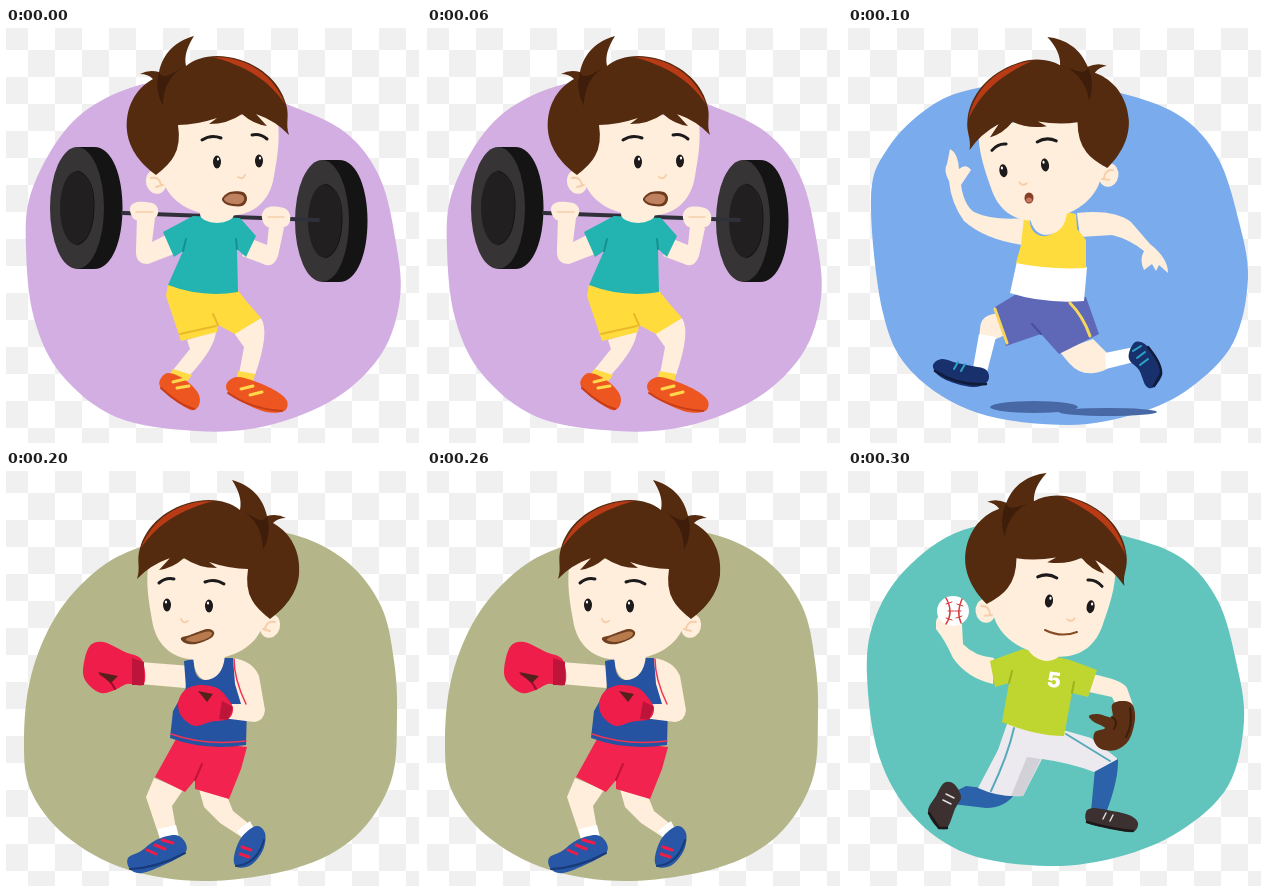
These frames come from a looping animation (415 by 415 pixels, 0.4 s). An HTML page with a canvas:

```html
<!DOCTYPE html>
<html lang="en">
<head>
<meta charset="utf-8">
<title>Sporty boy</title>
<style>
html, body { margin: 0; width: 100%; height: 100%; overflow: hidden; background: #fff; }
canvas { display: block; width: 415px; height: 415px; }
</style>
</head>
<body>
<canvas id="stage" width="415" height="415"></canvas>
<script>
const ctx = document.getElementById('stage').getContext('2d');
const SKIN = '#feeedb', SHADE = '#f6cfaa', HAIR = '#552b10', INK = '#1d1a1b';

// Straight or curved shape from SVG path data.
function fill(color, d) {
  ctx.fillStyle = color;
  ctx.fill(new Path2D(d));
}
function line(color, width, d) {
  ctx.strokeStyle = color;
  ctx.lineWidth = width;
  ctx.lineCap = ctx.lineJoin = 'round';
  ctx.stroke(new Path2D(d));
}
function oval(color, x, y, rx, ry, turn = 0) {
  ctx.fillStyle = color;
  ctx.beginPath();
  ctx.ellipse(x, y, rx, ry, turn, 0, 7);
  ctx.fill();
}
// Smooth closed curve through "x,y x,y ..." points.
function smooth(color, text) {
  const p = text.split(' ').map(s => s.split(',').map(Number));
  const n = p.length, at = i => p[(i + n) % n];
  ctx.beginPath();
  ctx.moveTo(...p[0]);
  for (let i = 0; i < n; i++) {
    const [a, b, c, d] = [at(i - 1), at(i), at(i + 1), at(i + 2)];
    ctx.bezierCurveTo(b[0] + (c[0] - a[0]) / 6, b[1] + (c[1] - a[1]) / 6,
      c[0] - (d[0] - b[0]) / 6, c[1] - (d[1] - b[1]) / 6, ...c);
  }
  ctx.fillStyle = color;
  ctx.fill();
}

function checkerboard() {
  const cell = 27, start = -5;
  ctx.fillStyle = '#fff';
  ctx.fillRect(0, 0, 415, 415);
  ctx.fillStyle = '#f0f0f0';
  for (let row = 0; row < 16; row++)
    for (let col = row % 2; col < 16; col += 2)
      ctx.fillRect(start + col * cell, start + row * cell, cell, cell);
  ctx.fillStyle = '#fff';
  ctx.fillRect(413, 0, 2, 415);
}

// Head looking right; tilt turns it about the near eye, mirror is the flip width.
function head({ tilt = 0, dx = 0, dy = 0, mirror = 0 }) {
  ctx.save();
  if (mirror) {
    ctx.translate(mirror, 0);
    ctx.scale(-1, 1);
  }
  ctx.translate(211 + dx, 134 + dy);
  ctx.rotate(tilt);
  ctx.translate(-211, -134);
  fill(SKIN, 'M150 90C150 125 154 148 160 160C171 180 195 188 220 188C247 188 264 174 268 148C271 130 275 112 271 86Z');
  oval(SKIN, 150, 154, 10, 12, -.3);
  line(SHADE, 2, 'M145 150Q153 148 155 157M150 159L157 157');
  fill(HAIR, `M150 147C136 137 123 122 121 103C119 80 129 61 147 51
    Q142 46 134 46Q143 41 153 44C157 25 170 13 188 8C181 19 178 28 180 38
    C190 30 205 26 222 29C253 34 274 54 280 76C284 89 279 95 283 107
    Q270 93 250 86L261 98Q247 96 236 86Q222 96 203 96L211 90Q190 97 172 97
    Q175 116 168 128Q164 136 150 147Z`);
  fill('#3e1d0b', 'M180 38C163 46 157 62 157 78Q148 61 153 44C157 54 169 43 180 38Z');
  fill('#b83b16', 'M207 29C242 29 268 47 279 76C262 51 239 38 207 29Z');
  line(INK, 3, 'M196 112Q205 106 215 110M246 107Q254 105 261 111');
  oval(INK, 211, 134, 4, 6.5);
  oval(INK, 253, 133, 4, 6.5);
  oval('#fff', 212, 131, 1.1, 1.5);
  oval('#fff', 254, 130, 1.1, 1.5);
  line(SHADE, 2, 'M232 149Q237 152 239 147');
  ctx.restore();
}

function weight(x, y, innerX) {
  const outline = `M${x} ${y - 61}h17c38 0 38 122 0 122h-17Z`;
  fill('#151414', outline);
  oval('#373435', x, y, 27, 61);
  oval('#211f20', innerX, y, 17, 37);
  line('#151414', 1, `M${innerX} ${y - 37}q18 5 17 37t-17 37`);
}

function lifter() {
  smooth('#d3aee2', '20,220 25,165 57,105 100,70 160,52 225,58 283,77 340,105 374,150 390,215 394,270 376,325 330,370 260,398 190,403 110,389 55,346 28,290');
  weight(71, 180, 71);
  weight(316, 193, 319);
  line('#30303a', 4, 'M117 185L312 192');

  fill(SKIN, 'M131 188L149 190L146 214L162 206L168 226L142 236Q129 236 130 222Z');
  fill(SKIN, 'M263 198L278 200L272 228Q268 239 260 237L236 228L246 211L261 217Z');
  fill(SKIN, 'M181 312L210 303Q209 320 184 347L167 342L184 321Z');
  fill(SKIN, 'M228 305L255 290Q264 304 249 347L233 346L238 319Z');
  fill('#ffdb45', 'M167 341L186 347L180 355L163 348ZM232 343L249 346L247 355L231 351Z');
  smooth('#ed5521', '154,352 162,345 178,351 192,365 193,377 185,382 167,371 155,360');
  smooth('#ed5521', '221,355 231,349 248,353 270,363 281,373 278,383 260,384 236,374 222,364');
  line('#c63d17', 2, 'M155 360Q173 377 188 381M222 365Q245 381 276 383');
  line('#ffd84b', 3, 'M167 354L179 351M171 360L183 358M235 361L247 358M244 367L256 364');
  fill('#ffdc3b', 'M162 256L160 268L175 313L211 304L212 297L229 306L255 290L241 274L230 260Z');
  line('#e9b92a', 2, 'M212 297L207 286M174 306L210 298');
  fill('#23b3b0', 'M187 188L157 204L168 229L177 223L162 257Q196 270 232 264L231 221L240 229L250 208L234 190Z');
  line('#15908e', 2, 'M177 223L180 211M231 221L230 211');
  oval(SKIN, 211, 186, 17, 9);
  smooth(SKIN, '124,180 131,174 146,175 152,181 150,189 140,193 128,191');
  smooth(SKIN, '256,186 263,179 278,180 284,187 282,197 270,201 259,197');
  line(SHADE, 1.5, 'M130 184h17M262 189h16');

  head({});
  smooth('#6f3a1d', '216,171 224,164 237,164 241,171 236,178 222,177');
  smooth('#bf8260', '218,171 225,166 236,167 238,172 233,176 223,175');
}

function runner() {
  smooth('#7aaced', '23,170 40,120 80,80 125,61 200,54 280,67 335,90 370,130 390,190 400,250 385,315 342,360 290,385 220,397 130,385 65,345 35,285');
  oval('#4868a5', 186, 379, 44, 6);
  oval('#4868a5', 260, 384, 49, 4);

  fill(SKIN, `M102 121Q110 125 111 141Q118 135 123 142L113 157Q116 177 126 184
    Q145 193 177 190L174 217Q136 211 116 193Q103 175 101 153Q95 142 99 136Z`);
  fill(SKIN, `M229 185Q266 181 283 194L302 216Q320 230 320 245L311 237L308 243
    L304 236L296 242Q291 232 296 223Q281 211 264 207L232 209Z`);
  fill(SKIN, 'M152 285Q132 286 132 301L131 312L148 311L162 305Z');
  fill('#fff', 'M131 306L148 309L139 344L125 340Z');
  fill(SKIN, 'M211 323L245 311L259 325L259 341Q236 352 221 335Z');
  fill('#fff', 'M257 325L286 319L290 333L258 341Z');
  smooth('#18316d', '85,337 94,331 109,335 124,338 137,341 141,348 138,355 126,359 106,355 90,347');
  line('#101b38', 2.5, 'M87 343Q110 358 138 356');
  line('#2ba7c9', 2, 'M110 334L106 341M117 336L113 343');
  smooth('#18316d', '281,325 286,315 293,314 301,320 311,336 314,347 306,359 298,358 291,342 282,333');
  line('#101b38', 2.5, 'M300 319Q314 336 313 346L306 358');
  line('#2ba7c9', 2, 'M285 323l8-5M289 330l8-6M292 337l8-6');

  fill('#5e68b6', 'M170 265L147 279L158 318L193 306L211 326L251 306L238 269Z');
  line('#48509a', 2, 'M193 306L184 296');
  line('#f6d75c', 3, 'M147 281L159 315M222 275Q235 288 242 308');
  fill('#fff', 'M169 233L162 265Q196 276 236 273L239 239Z');
  fill('#ffdc3d', 'M176 190L173 217L168 235Q201 242 238 240L238 212L229 201L228 186L218 184Q210 210 193 208Q180 204 182 188Z');
  fill(SKIN, 'M181 184L219 182Q218 206 197 207Q183 205 181 184Z');

  head({ tilt: .162, dx: -10, dy: 3, mirror: 398 + 12 - 12 });
  oval('#873e27', 181, 170, 4.5, 5.5);
  oval('#c87761', 181, 172, 3, 2.5);
}

function boxer() {
  smooth('#b5b58a', '18,270 25,205 50,145 90,100 135,76 210,58 285,63 340,90 375,135 388,190 391,245 385,310 350,365 290,397 200,410 120,398 60,365 25,320');
  fill(SKIN, 'M134 191L185 195L179 217L134 213Z');
  fill(SKIN, 'M148 307L177 319L166 335L171 363L153 365L140 326Z');
  fill(SKIN, 'M193 318L221 325L227 340L247 356L237 367L214 352L198 336Z');
  fill('#fff', 'M152 358L170 354L173 366L154 370ZM231 360L244 350L248 358L237 368Z');
  smooth('#2757a6', '122,387 135,380 150,369 169,364 179,371 179,382 160,393 136,402 124,398');
  smooth('#2757a6', '228,386 235,367 250,355 259,362 257,379 245,394 231,396');
  line('#173a78', 2, 'M124 398Q151 397 179 382M230 395Q251 393 258 369');
  line('#ed1d4a', 3, 'M141 379l9 4M149 374l10 4M156 369l11 3M236 376l9 3M234 383l9 3');
  fill('#f2234e', 'M170 268L149 306L179 321L189 309L189 318L223 328L235 298L241 276Z');
  line('#c31339', 2, 'M189 309L196 293');
  fill('#2552a1', 'M178 190L180 217L167 240L164 267Q199 280 240 274L241 236L231 210L228 187L218 187Q216 208 198 209Q187 207 188 188Z');
  fill(SKIN, 'M187 184L219 184Q217 208 199 209Q188 206 187 184Z');
  fill(SKIN, 'M227 187Q247 190 253 205L259 239Q258 250 248 251L216 247L219 233L235 233L229 213Z');
  line('#ef3454', 1.5, 'M228 188Q228 208 240 233M165 263Q199 275 240 270');
  smooth('#ef1d4a', '77,200 83,176 97,171 119,181 136,189 138,213 121,213 109,219 95,222 82,213');
  fill('#bd1539', 'M126 187L138 191L138 214L126 214Z');
  line('#a30d2d', 2, 'M94 203Q105 209 109 218');
  fill('#54211c', 'M92 201L112 205L105 212Z');
  smooth('#ef1d4a', '172,233 178,220 193,214 211,217 222,228 227,238 222,248 204,251 189,255 176,246');
  fill('#bd1539', 'M216 230L227 236L222 249L213 248Z');
  fill('#54211c', 'M192 220L207 223L201 231Z');

  head({ dy: 1, mirror: 414 });
  smooth('#704022', '175,167 184,164 201,158 208,161 205,167 190,173 179,172');
  smooth('#b77b4e', '180,168 199,161 206,162 202,167 189,171');
}

function pitcher() {
  smooth('#62c5bd', '19,205 26,150 57,99 115,59 200,50 280,66 335,88 370,130 388,190 396,250 380,315 332,360 270,386 200,395 120,383 65,345 31,285');
  fill(SKIN, 'M88 151Q89 142 99 146L114 153L115 173Q126 185 146 187L145 213Q119 207 105 187Q97 169 88 158Z');
  fill(SKIN, 'M244 203Q275 209 279 217L285 234L270 238L264 226L241 221Z');
  oval('#fff', 105, 140, 16, 15);
  line('#d83b3e', 1.5, 'M98 127Q106 141 98 153M114 128Q108 141 113 152');
  line('#d83b3e', 1, 'M98 133l6-2M100 140l6 0M98 147l6 2M109 133l6 2M107 140l6 0M108 147l6-2');

  fill('#2b62aa', 'M118 315L168 321Q158 337 138 337L104 333L110 319Z');
  fill('#2b62aa', 'M247 298L270 287Q271 308 258 342L243 340Z');
  smooth('#3c3030', '80,340 88,325 96,312 106,313 113,326 107,338 99,357 88,355');
  smooth('#3c3030', '238,341 245,337 259,339 281,344 290,352 284,361 260,357 240,352');
  line('#1c191a', 2.5, 'M81 342L91 357L99 357M239 351Q262 358 285 360');
  line('#ddd', 1.5, 'M98 323l8 4M95 329l8 4M258 342l-3 6M265 344l-3 6');
  fill('#eceaee', 'M160 250L150 279L130 317Q152 327 175 325L194 288Q223 292 246 301L270 288L243 267L215 259Z');
  fill('#d3d1d8', 'M193 288L175 325L163 325L179 286Z');
  line('#57aabb', 2, 'M166 257Q160 284 143 320M218 263L262 290');
  fill('#bfd630', 'M175 178L142 190L147 216L161 212L154 251Q188 265 216 265L224 222L240 226L249 199L222 189Z');
  line('#9cb31f', 2, 'M161 212L164 200M224 222L226 211');
  fill(SKIN, 'M178 175L213 178Q213 190 197 190Q184 188 178 175Z');
  ctx.save();
  ctx.translate(206, 209);
  ctx.rotate(.12);
  ctx.fillStyle = '#fff';
  ctx.font = '900 21px Inter, sans-serif';
  ctx.textAlign = 'center';
  ctx.textBaseline = 'middle';
  ctx.fillText('5', 0, 1);
  ctx.restore();
  smooth('#5c3014', '241,245 250,243 264,246 264,234 273,230 284,233 287,248 281,269 268,279 253,278 246,270 247,261 257,257 246,251');
  line('#3d1d0b', 2, 'M264 246Q271 250 266 258M282 237Q285 254 278 266');

  head({ tilt: .162, dx: -10, dy: -4 });
  line('#874b28', 2, 'M197 159Q213 167 229 161');
}

const scenes = [lifter, runner, boxer, pitcher];
let shown = -1;

function play() {
  const current = Math.floor(performance.now() / 100) % scenes.length;
  if (current !== shown) {
    shown = current;
    checkerboard();
    scenes[current]();
  }
  requestAnimationFrame(play);
}
play();
</script>
</body>
</html>
```
